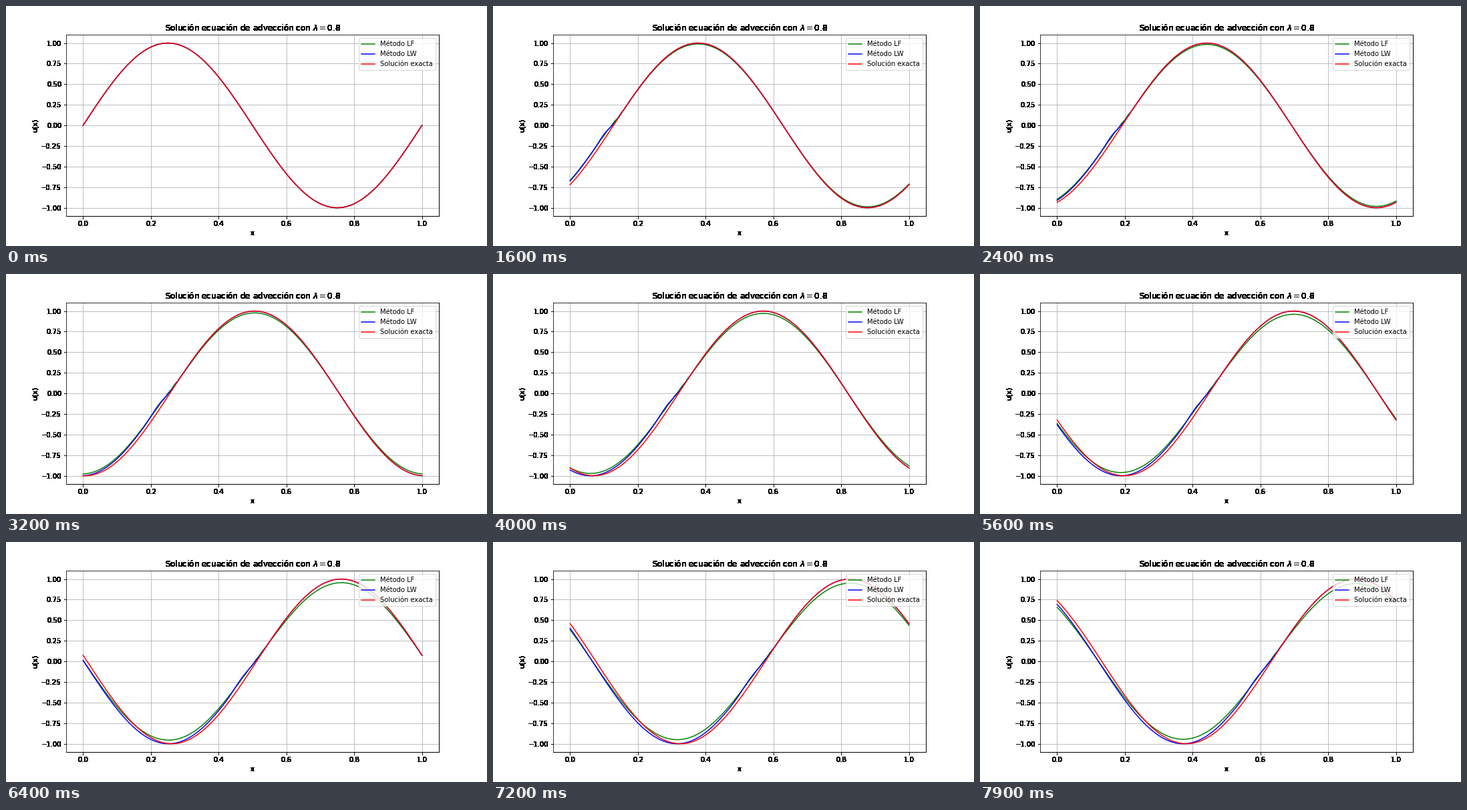
Write a matplotlib script that moves like this. It is 720 px wide and 360 px high and loops after 8 s.

```python
import numpy as np
import matplotlib.pyplot as plt
from matplotlib.animation import FuncAnimation

FRAMES, INTERVAL = 80, 100
LAM, DX = 0.8, 0.01
DT = LAM * DX

x = np.linspace(0, 1, 101)


def lax_friedrichs(u):
    left, right = np.roll(u, 1), np.roll(u, -1)
    return (left + right) / 2 - LAM / 2 * (right - left)


def lax_wendroff(u):
    left, right = np.roll(u, 1), np.roll(u, -1)
    return u - LAM / 2 * (right - left) + LAM**2 / 2 * (right - 2 * u + left)


def evolve(step):
    states = [np.sin(2 * np.pi * x)]
    for _ in range(FRAMES - 1):
        states.append(step(states[-1]))
    return states


def harden(image, dpi):
    """Make every touched pixel solid black, without antialiasing."""
    out = np.zeros_like(image)
    out[..., 3] = image[..., 3] > 0
    return out, 0, 0


lf = evolve(lax_friedrichs)
lw = evolve(lax_wendroff)
exact = [np.sin(2 * np.pi * (x - n * DT)) for n in range(FRAMES)]

plt.rcParams.update({"font.family": "DejaVu Sans", "font.size": 10})
fig = plt.figure(figsize=(10, 5), dpi=72, facecolor="white")
box = [0.125, 0.125, 0.775, 0.755]
limits = dict(xlim=(-0.05, 1.05), ylim=(-1.1, 1.1))

ax = fig.add_axes(box, **limits)
ax.grid(True)
ax.tick_params(length=0, labelbottom=False, labelleft=False)

# Ticks, labels and title sit on their own hard-edged layer.
frame = fig.add_axes(box, label="frame", **limits)
frame.patch.set_visible(False)
frame.spines[["left", "top"]].set_visible(False)
frame.set_title(r"Solución ecuación de advección con $\lambda = 0.8$")
frame.set_xlabel("x")
frame.set_ylabel("u(x)")
frame.set_agg_filter(harden)

curves = [
    (ax.plot(x, states[0], color=color, lw=1.5, label=label)[0], states)
    for states, color, label in [
        (lf, "green", "Método LF"),
        (lw, "blue", "Método LW"),
        (exact, "red", "Solución exacta"),
    ]
]
ax.legend(loc="upper right")


def update(n):
    for line, states in curves:
        line.set_ydata(states[n])
    return [line for line, _ in curves]


anim = FuncAnimation(fig, update, frames=FRAMES, interval=INTERVAL,
                     repeat=True, repeat_delay=0)
plt.show()
```
